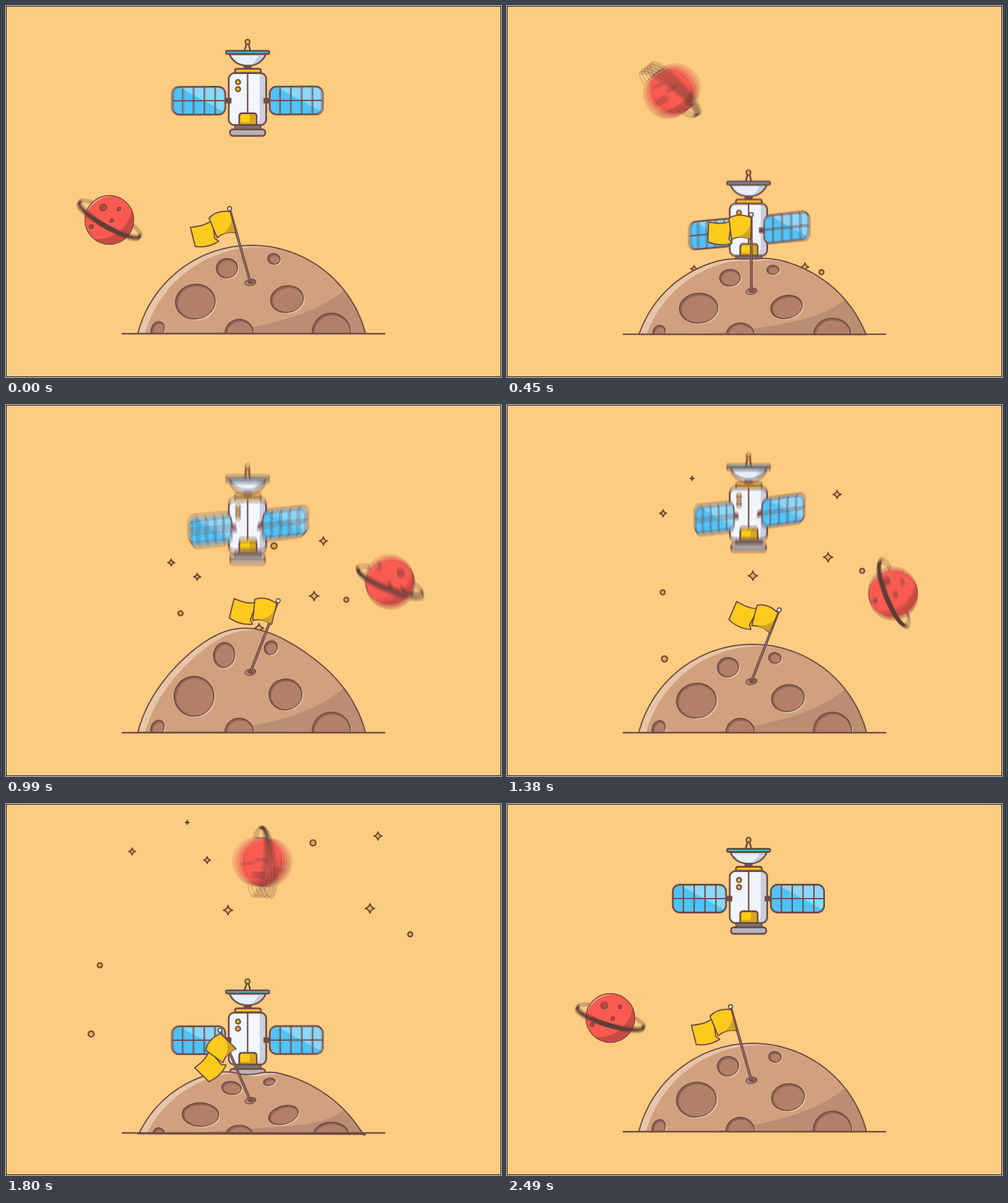
Animation of 800 by 600 pixels, one loop 2.52 s. Source, as an HTML page:

```html
<!DOCTYPE html>
<html lang="en">
<head>
<meta charset="utf-8">
<title>Bouncing satellite</title>
<style>
html, body { margin: 0; width: 100%; height: 100%; overflow: hidden; background: #fecc80; }
svg { display: block; width: 100vw; height: 100vh; }
.ink { stroke: #6f4a45; stroke-width: 2.8; stroke-linejoin: round; stroke-linecap: round; }
.line { fill: none; }
.dark { fill: #6f4a45; }
.gold { fill: #fdc31a; }
.thin { stroke-width: 2; }
.blur { isolation: isolate; }
.blur > g { mix-blend-mode: plus-lighter; }
</style>
</head>
<body>
<svg viewBox="0 0 800 600">
  <defs>
    <clipPath id="moonClip"><path class="moonShape"/></clipPath>
    <clipPath id="far"><rect x="-70" y="-30" width="140" height="29"/></clipPath>
    <clipPath id="near"><rect x="-70" y="-2" width="140" height="30"/></clipPath>
  </defs>
  <rect width="800" height="600" fill="#fecc80"/>
  <g id="stars"></g>
  <g id="planet" class="blur"></g>
  <g id="sat" class="blur"></g>
  <g clip-path="url(#moonClip)">
    <path class="moonShape" fill="#e8c5a6"/>
    <path class="moonShape" fill="#d1a17f" transform="translate(11 3)"/>
    <path id="shade" fill="#bb8d73"/>
    <g id="craters"></g>
  </g>
  <path class="moonShape ink line thin"/>
  <path id="ground" class="ink line" d="M188 530H612" style="stroke-width:2.4"/>
  <g id="hole">
    <ellipse rx="9" ry="5" transform="rotate(-10)" fill="#b98a72" stroke="#6f4a45" stroke-width="1.4"/>
    <ellipse cx="2" cy="-1" rx="6" ry="3.4" transform="rotate(-10)" fill="#8c6252" stroke="#6f4a45"/>
    <g id="pole">
      <path d="M0 0V-122" class="ink line" style="stroke-width:4.4"/>
      <path d="M0 -1V-122" fill="none" stroke="#a17c70" stroke-width="1.2"/>
      <g id="flag" class="ink thin">
        <path fill="#fdcb1e" d="M-32 -114C-45 -108 -56 -110 -69 -112L-70 -80C-58 -75 -46 -73 -31 -78L-36 -84Z"/>
        <path fill="#fdcb1e" d="M0 -119C-12 -124 -24 -126 -36 -118L-32 -84C-22 -89 -12 -89 -1 -84Z"/>
        <path fill="#cfa125" stroke="none" d="M-2 -108C-4 -97 -12 -91 -24 -87C-16 -88 -9 -87 -2 -85Z"/>
      </g>
      <circle cy="-124" r="3.2" fill="#fff" class="ink" style="stroke-width:1.8"/>
    </g>
  </g>
  <rect x=".5" y=".5" width="799" height="599" fill="none" stroke="#241c12"/>
</svg>
<script>
const LOOP = 2520, HALF = LOOP / 2, SAMPLES = 5, SHUTTER = 18;
const $ = id => document.getElementById(id);
const move = (e, value) => e.setAttribute('transform', value);
const clamp = u => Math.min(1, Math.max(0, u));
const lerp = (a, b, u) => a + (b - a) * u;
const ease = u => (1 - Math.cos(Math.PI * clamp(u))) / 2;
// Rises from 0 at a to 1 midway and back to 0 at b
const arch = (t, a, b) => Math.sin(Math.PI * clamp((t - a) / (b - a)));
const bump = (t, a, b) => arch(t, a, b) ** 2;

function add(parent, tag, attrs, html = '') {
  const e = document.createElementNS('http://www.w3.org/2000/svg', tag);
  for (const k in attrs) e.setAttribute(k, attrs[k]);
  e.innerHTML = html;
  parent.appendChild(e);
  return e;
}

// ---- Bounce: free fall, contact with the moon, free rise; twice per loop
const G = .00174, FALL = 345;
function bounce(t) {
  const second = t >= HALF, p = second ? t - HALF : t;
  const top = second ? 1095 : 1151, launch = top - FALL;
  const press = bump(p, FALL, launch);
  const y = p < FALL ? G * p * p
    : p < launch ? G * FALL * FALL + 22 * press * press
    : G * Math.max(0, top - p) ** 2;
  const fold = .36 * arch(p, 0, 540) + .45 * arch(p, 560, 1150) ** 3;
  return { y, fold, squash: press - arch(p, launch, launch + 370) };
}

// ---- Satellite
const wing = side => `<g class="wing">
  <rect x="${side < 0 ? 43 : -53}" y="-4.5" width="10" height="9" class="dark"/>
  <rect x="-43" y="-22.5" width="86" height="45" rx="11" fill="#4fc0fa"/>
  <path d="M-32 -22H32Q43 -22 43 -12V19Z" fill="#8bd5f8"/>
  <path class="ink line" style="stroke-width:2.2" d="M-43 0H43M-26 -22V22M-8.5 -22V22M9 -22V22M26.5 -22V22"/>
  <rect class="ink line" x="-43" y="-22.5" width="86" height="45" rx="11"/></g>`;
const lamp = (x, y) => `<circle class="ink gold" cx="${x}" cy="${y}" r="3.7" style="stroke-width:2.4"/>`;

const satArt = `
  <path class="ink line" d="M389 61L386 71M392 61L394.5 71"/>
  <rect class="dark" x="384" y="95" width="13" height="7"/>
  <path class="ink" fill="#e3ecf7" d="M361 78H420C414 91 403 96.5 390.5 96.5S367 91 361 78Z"/>
  <path fill="#c3cad9" d="M408 79.5H417C412 89 404 94 396 95C402 91 406 86 408 79.5Z"/>
  <rect class="ink" fill="#4ab2e2" x="355.5" y="72.5" width="70" height="5" rx="2.5"/>
  <path class="ink gold" d="M370 108V105Q370 101.5 374 101.5H408Q412 101.5 412 105V108Z"/>
  <rect class="ink thin" fill="#77706e" x="370" y="192" width="42" height="8"/>
  <rect class="ink" fill="#b4b3b6" x="362" y="199.5" width="57" height="10.5" rx="4.5"/>
  <rect fill="#eef2fb" x="360" y="108.5" width="60.5" height="84" rx="9"/>
  <path fill="#c9cddb" d="M410 109.5H413A7 7 0 0 1 420 116V185A7 7 0 0 1 413 191.5H404Q410 188 410 180Z"/>
  <path class="ink line" style="stroke-width:2.3" d="M390.5 109V174"/>
  <rect class="ink line" x="360" y="108.5" width="60.5" height="84" rx="9"/>
  <path class="ink" fill="#fdc90f" d="M377 192V178Q377 173.5 382 173.5H400Q405 173.5 405 178V192Z"/>
  <path fill="#d5a21f" d="M394 175H400Q403.5 175 403.5 178V190.5H379V188H390Q394 188 394 184Z"/>`
  + lamp(390.3, 58) + lamp(375, 123) + lamp(375, 134.5) + wing(-1) + wing(1);

function poseSat(c, t) {
  const { y, fold } = bounce(t);
  const left = 1 - 1.15 * fold, right = 1 - .9 * fold, sag = Math.min(1, fold * 5);
  move(c.g, `translate(0 ${y})`);
  move(c.wings[0], `matrix(${left} ${-.08 * sag} 0 1 ${311 + 105 * fold} ${153 + 5 * sag})`);
  move(c.wings[1], `matrix(${right} ${-.6 * fold * right} 0 1 ${469.5 - 100 * fold} ${153 - 34 * fold})`);
}

// ---- Planet
const dot = (x, y, r) => `<circle cx="${x}" cy="${y}" r="${r}" fill="#f9877a"/>
  <circle cx="${x - .8}" cy="${y - .8}" r="${r - .6}" fill="#b8433c" stroke="#7d3f39" stroke-width="1.3"/>`;
const ringPath = 'M-59 0A59 16 0 0 1 59 0A59 16 0 0 1 -59 0ZM-54 -2.5A54 10.5 0 0 1 54 -2.5A54 10.5 0 0 1 -54 -2.5Z';
// The clip must turn with the ring, so it sits inside the turned group
const halfRing = clip => `<g class="ring"><path d="${ringPath}" fill="#5c3c36" fill-rule="evenodd" clip-path="url(#${clip})"/></g>`;
const planetArt = halfRing('far') + `
  <circle r="39.5" fill="#f9574e"/>
  <path d="M36 -16A39.5 39.5 0 0 1 -24 31A56 56 0 0 0 36 -16Z" fill="#c84b41"/>
  <path d="M-38 -8A39 39 0 0 1 7 -38A47 47 0 0 0 -38 -8Z" fill="#fba18c"/>
  <g class="roll">${dot(-9, -19, 6.5) + dot(16.5, -17, 3.6) + dot(5, 2, 3.8) + dot(-28, 12, 4)}</g>
  <circle r="39.5" fill="none" stroke="#80463e" stroke-width="1.5"/>` + halfRing('near');

function posePlanet(c, t) {
  const a = Math.PI * (ease(t / 1205) - ease((t - 1200) / 1240));
  const turns = Math.floor(t / HALF) + clamp((t % HALF - 120) / 1110);
  const spin = 29 + 1080 * t / LOOP - 208 * bump(t, 620, 2470);
  move(c.g, `translate(${397 - 230 * Math.cos(a)} ${346 - 253 * Math.sin(a)})`);
  move(c.roll, `rotate(${-360 * turns})`);
  c.rings.forEach(r => move(r, `rotate(${spin})`));
}

// ---- Motion blur: faint copies at nearby times, added together
const copies = (parent, art) => Array.from({ length: SAMPLES }, () => {
  const g = add(parent, 'g', { opacity: 1 / SAMPLES }, art);
  return { g, wings: g.querySelectorAll('.wing'), rings: g.querySelectorAll('.ring'), roll: g.querySelector('.roll') };
});
const sats = copies($('sat'), satArt), planets = copies($('planet'), planetArt);

function blur(list, pose, t) {
  list.forEach((c, i) => {
    const s = t + (i / (SAMPLES - 1) - .5) * SHUTTER;
    pose(c, (s + LOOP) % LOOP);
  });
}

// ---- Moon: a circle cap whose points are pushed down or pulled up
const R = 190, MID = 397, FLOOR = 530, CAP = 143, EDGE = Math.asin(184 / R);
const shapes = document.querySelectorAll('.moonShape');
const level = y => clamp((FLOOR - y) / CAP);

function warp(x, y, m) {
  const u = level(y);
  return m > 0
    ? y + m * (42 * Math.sqrt(u) * (1 + (x - MID) / 1000) + 2 * (1 - u))
    : y + m * 27 * u * Math.exp(-(((x - 370) / 110) ** 2));
}

// Centre x, y, radii and tilt
const craters = [
  [306, 478, 32, 28, -8], [357, 424, 17, 15.5, -10], [433, 409, 10, 8.5, 10],
  [454, 474, 26.5, 21.5, -10], [377, 529, 23, 22, 0], [526, 528, 31, 31, 0], [245, 523, 10, 13, 25]
].map(([x, y, rx, ry, tilt]) => ({ x, y, rx, ry, tilt, g: add($('craters'), 'g', {},
  `<ellipse fill="#ebc6a8"/><ellipse fill="#916453" class="ink" style="stroke-width:1.8"/><ellipse fill="#b28069"/>`) }));

function drawCrater(c, m) {
  const u = level(c.y), press = Math.max(m, 0), pull = Math.max(-m, 0);
  const h = c.ry * (1 - .33 * press + .4 * u * pull), w = c.rx * (1 - .08 * press);
  const rot = c.tilt + u * u * (press * .8 * (MID - c.x) + pull * 32);
  move(c.g, `translate(${c.x + press * u * .25 * (MID - c.x) - 6 * u * pull} ${warp(c.x, c.y, m)}) rotate(${rot})`);
  const turn = -rot;
  [[2.2, 0], [0, 0], [1.4, 2.2]].forEach(([shift, inset], i) => {
    const e = c.g.children[i];
    e.setAttribute('rx', w - inset);
    e.setAttribute('ry', h - inset);
    move(e, `rotate(${turn}) translate(${shift} ${shift}) rotate(${rot})`);
  });
}

function drawMoon(m) {
  const steps = 64, pts = [];
  for (let i = 0; i <= steps; i++) {
    const a = EDGE * (2 * i / steps - 1);
    const x = MID + R * Math.sin(a), y = FLOOR - CAP + R * (1 - Math.cos(a));
    const dent = 9 * Math.max(m, 0) * Math.exp(-(((x - 390) / 28) ** 2));
    pts.push(x.toFixed(2) + ' ' + (warp(x, y, m) + dent).toFixed(2));
  }
  const d = 'M' + pts.join('L') + 'Z';
  shapes.forEach(s => s.setAttribute('d', d));
  const e = warp(530, 458, m);
  $('shade').setAttribute('d', `M548 ${e}C505 ${e + 36} 445 517 310 532H600V${e}Z`);
  move($('ground'), `translate(0 ${2 * Math.max(m, 0)})`);
  craters.forEach(c => drawCrater(c, m));
}

// ---- Stars: radius, place soon after the burst, place high in the sky
const stars = [
  [4, 301, 191, 293, 30], [5.5, 267, 255, 204, 77], [5.5, 309, 278, 325, 91],
  [6.5, 513, 220, 601, 52], [7.5, 498, 309, 588, 169], [7.5, 409, 361, 359, 172],
  [3.8, 550, 315, 653, 211, 'o'], [3.8, 282, 337, 152, 261, 'o'],
  [4.7, 433, 228, 496, 63, 'o'], [4.7, 290, 442, 138, 372, 'o']
].map(([r, x1, y1, x2, y2, round]) => {
  const q = r * .2;
  const g = round
    ? add($('stars'), 'circle', { r, fill: '#eda63a', class: 'ink', style: 'stroke-width:2.4' })
    : add($('stars'), 'path', {
        fill: r < 5 ? '#6f4a45' : '#f3b445', class: 'ink', style: `stroke-width:${r < 5 ? 1 : 2.2}`,
        d: `M0 ${-r}Q${q} ${-q} ${r} 0Q${q} ${q} 0 ${r}Q${-q} ${q} ${-r} 0Q${-q} ${-q} 0 ${-r}Z` });
  return { g, x1, y1, x2, y2 };
});

function drawStars(t) {
  const on = t > 425 && t < 2110;
  $('stars').style.display = on ? '' : 'none';
  if (!on) return;
  const out = 1 - (1 - clamp((t - 425) / 565)) ** 2;
  const s = Math.max(0, (t - 990) / 810), size = 1 - ease((t - 1820) / 290);
  stars.forEach(({ g, x1, y1, x2, y2 }) => {
    const x = lerp(lerp(MID, x1, .7 + .3 * out), x2, s * s);
    const y = lerp(lerp(442, y1, out), y2, s ** 1.1);
    move(g, `translate(${x} ${y}) scale(${size})`);
  });
}

// ---- Flag: leans right, then whips back past its resting angle
function drawFlag(t, m) {
  const whip = bump(t, 1500, 2200);
  const lean = -15.8 + 37 * (ease(t / 1000) - ease((t - 1380) / 400)) - 8 * whip;
  move($('hole'), `translate(395 ${warp(395, 447, m)})`);
  move($('pole'), `rotate(${lean})`);
  move($('flag'), `rotate(${-25 * whip - 9 * bump(t, 600, 1350)} 0 -116)`);
}

function render(t) {
  const m = bounce(t).squash;
  blur(sats, poseSat, t);
  blur(planets, posePlanet, t);
  drawMoon(m);
  drawStars(t);
  drawFlag(t, m);
}

const start = performance.now();
function tick(now) {
  render(Math.max(0, now - start) % LOOP);
  requestAnimationFrame(tick);
}
render(0);
requestAnimationFrame(tick);
</script>
</body>
</html>
```
